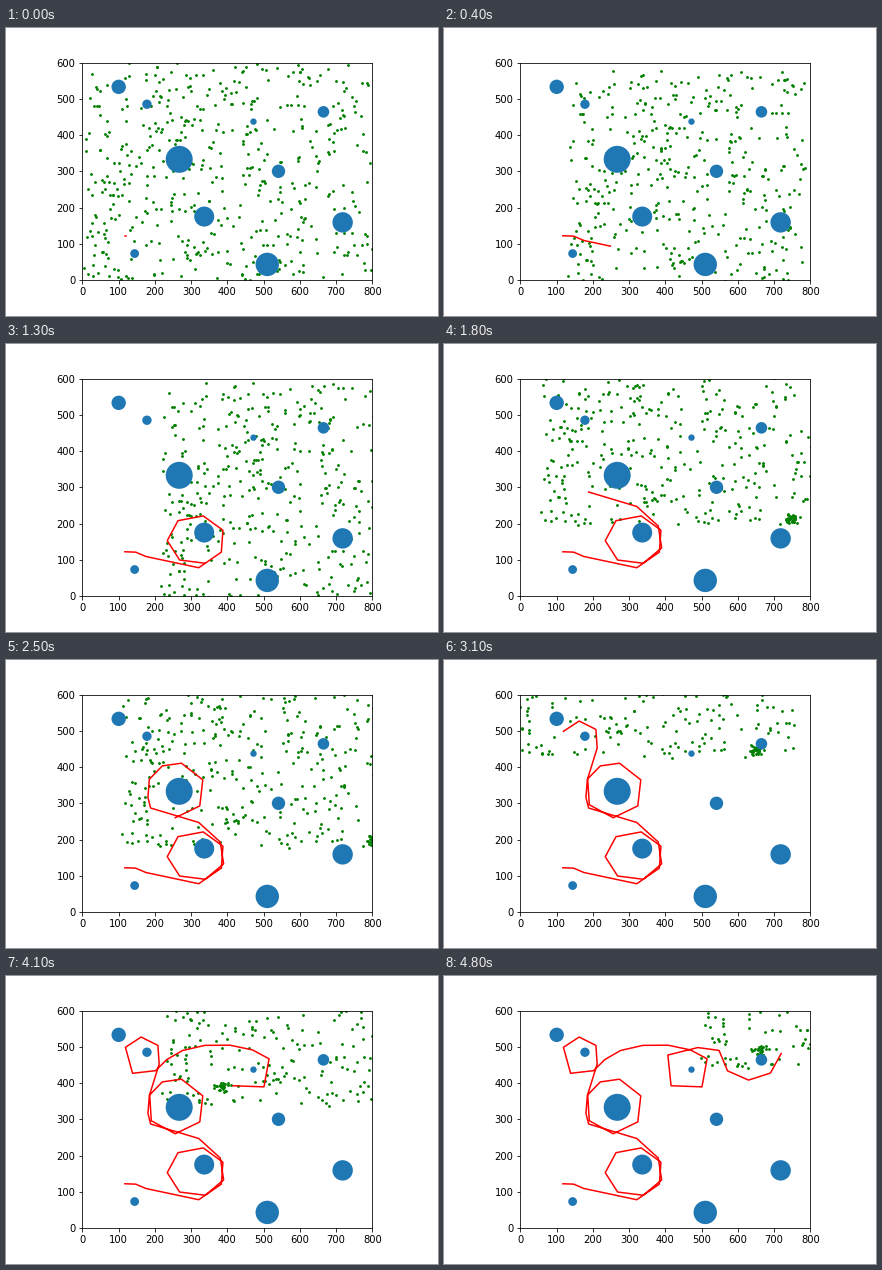
A matplotlib script that plays this animation: 432x288 px, repeating every 4900 ms.

```python
import numpy as np
import matplotlib.pyplot as plt
from matplotlib.animation import FuncAnimation

FRAMES, INTERVAL = 49, 100
WIDTH, HEIGHT = 800, 600
rng = np.random.default_rng(11)


def line_to(start, end, count):
    return np.linspace(start, end, count)


def arc(center, radii, first, last, count):
    """Points on an ellipse between two angles in degrees."""
    a = np.radians(np.linspace(first, last, count))
    return np.column_stack([np.cos(a), np.sin(a)]) * radii + center


def walk(start, sd):
    """Random walk of every particle: array of (step, particle, xy)."""
    noise = rng.normal(0, sd, (FRAMES,) + start.shape)
    noise[0] = 0
    return start + noise.cumsum(axis=0)


def cluster(center, count):
    return walk(rng.normal(center, (8, 6), (count, 2)), 0.3)


# Landmarks: x, y, diameter in points
rocks = np.array([
    (267, 333, 27), (336, 175, 20), (718, 159, 20.4), (510, 43, 23.4),
    (541, 300, 13.4), (665, 464, 11.6), (100, 533, 14.4), (178, 485, 9.4),
    (144, 73, 8.8), (472, 437, 6.4),
])

# The robot circles one landmark after another, one point per step
path = np.vstack([
    line_to((119, 122), (147, 121), 2),
    line_to((175, 109), (321, 78), 5),
    arc((314, 155), (80, 68), -30, 394, 9),
    line_to((321, 247), (188, 287), 3),
    arc((258, 336), (80, 76), 195, 118, 3),
    arc((258, 336), (80, 76), 79, -205, 6),
    arc((165, 475), (52, 52), -26, 153, 4),
    arc((165, 475), (55, 55), 241, 312, 2),
    arc((375, 430), (160, 76), 153, 29, 6),
    arc((460, 440), (65, 65), -51, -297, 4),
    arc((634, 490), (86, 82), 180, 354, 5),
])
trail = np.vstack([path[0] - (2, 0), path])

# Particles follow the robot with a slowly growing odometry error
t = np.linspace(0, 1, FRAMES)
shift = path - path[0] + np.column_stack([-105 * t ** 2, 80 * t])

cloud = walk(rng.uniform((0, 0), (WIDTH, HEIGHT), (500, 2)), 0.8)
# Resampled groups: particles, first and last step
groups = [
    (cluster((694, 19), 30), 14, 36),
    (cluster((165, 51), 26), 38, 48),
]

fig = plt.figure(figsize=(6, 4), dpi=72, facecolor="white")
fig.subplots_adjust(left=0.125, right=0.9, bottom=0.125, top=0.88)
ax = fig.add_subplot()
ax.set_aspect("equal")
ax.set_xlim(0, WIDTH)
ax.set_ylim(0, HEIGHT)

dots, = ax.plot([], [], "go", markersize=1.8)
line, = ax.plot([], [], "r-", linewidth=1.5)
ax.scatter(rocks[:, 0], rocks[:, 1], s=rocks[:, 2] ** 2,
           color="C0", linewidths=0, zorder=3)


def update(i):
    parts = [cloud[i]] + [g[i] for g, first, last in groups if first <= i <= last]
    points = np.vstack(parts) + shift[i]
    dots.set_data(points[:, 0], points[:, 1])
    line.set_data(trail[:i + 2, 0], trail[:i + 2, 1])
    return dots, line


anim = FuncAnimation(fig, update, frames=FRAMES, interval=INTERVAL,
                     repeat=True, repeat_delay=0)
plt.show()
```
